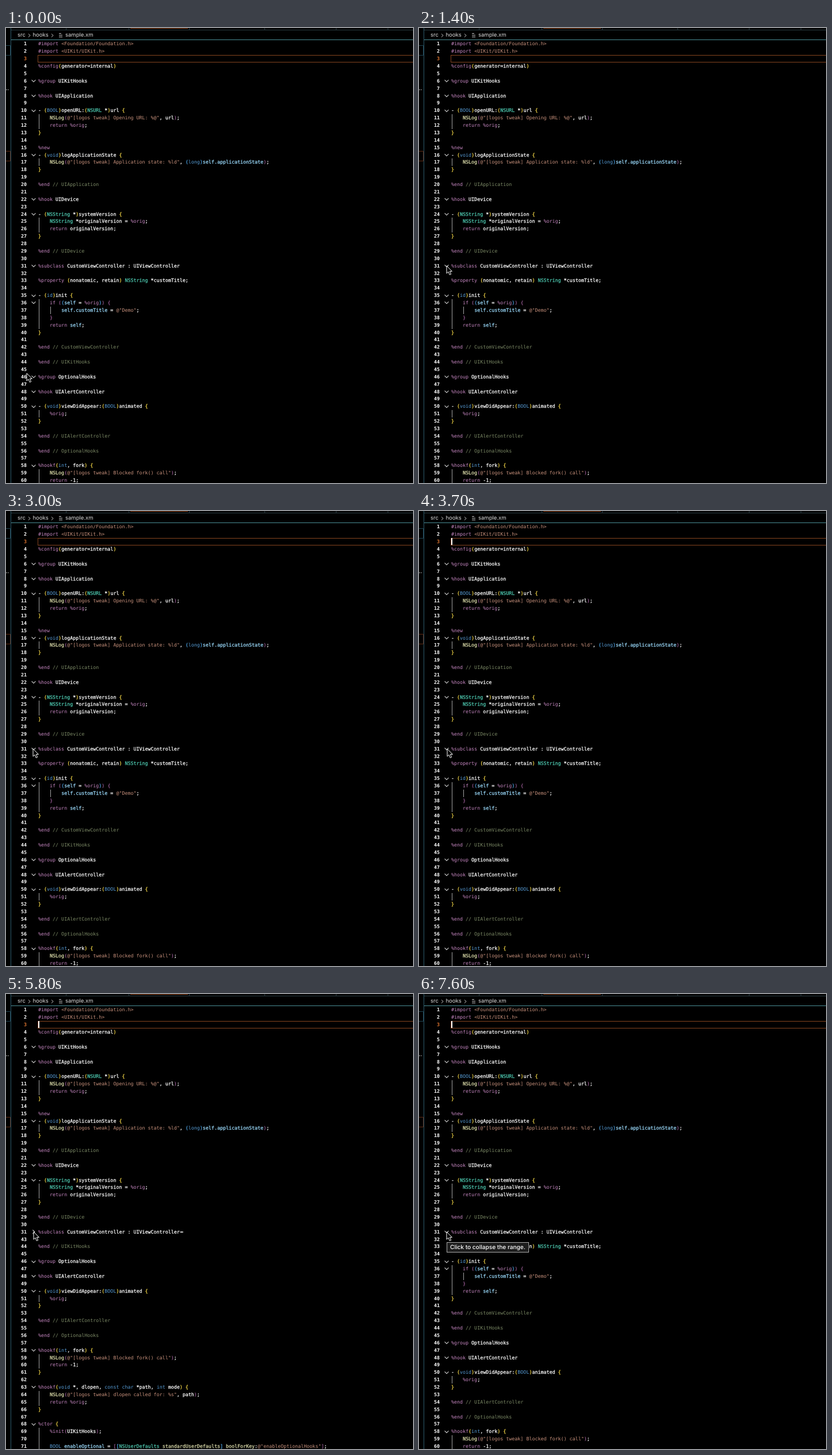
Write an HTML page that moves like this. It is 707x792 px and loops after 7800 ms.

```html
<!DOCTYPE html>
<html lang="en">
<head>
<meta charset="utf-8">
<title>Code folding</title>
<style>
html, body { margin: 0; width: 100%; height: 100%; overflow: hidden; background: #000; }
body { position: relative; color: #fff; text-rendering: geometricPrecision; font: 9.5px Inter, sans-serif; }
svg, .abs { position: absolute; }
svg { left: 0; top: 0; overflow: visible; fill: none; }
#code { top: 21.4px; left: 0; width: 100%; font: 8.33px/12.875px "DejaVu Sans Mono", monospace; }
.row { position: relative; height: 12.875px; white-space: pre; }
.num { position: absolute; left: 0; width: 36px; text-align: right; font-weight: bold; }
.text { position: absolute; left: 56px; -webkit-text-stroke: .25px; }
.keyword, .string, .comment, .prim { -webkit-text-stroke: 0; }
.guide { position: absolute; top: 0; width: 1px; height: 100%; background: #a2a2a2; }
.chevron { left: 43.7px; top: 2.4px; stroke: #ddd; stroke-width: 1.1; transform-origin: 4px 4px; }
.keyword { color: #c586c0; }
.string { color: #c8917c; }
.comment { color: #7c8a66; }
.prim { color: #569cd6; }
.type { color: #4ec9b0; }
.func { color: #dcdcaa; }
.prop { color: #9cdcfe; }
.level0 { color: #ffe04a; }
.level1 { color: #c777c2; -webkit-text-stroke: 0; }
.level2 { color: #4da6e8; }
#active { left: 55px; right: -2px; top: 47px; height: 11px; border: 1px solid #84431f; }
#caret { left: 56px; top: 47px; width: 2px; height: 12px; background: #fff; }
#tip { left: 48px; top: 432px; height: 16px; padding: 0 5px; border: 1px solid #aaa; background: #1d1d1d;
  line-height: 16px; white-space: pre; font-size: 10.1px; font-weight: 500; }
.crumb { top: 5px; line-height: 16px; color: #ddd; }
</style>
</head>
<body>
<svg width="707" height="792">
  <path d="M9 3.5H707M104.5 0V3M213.5 0V3M318.5 0V3M449.5 0V3M573.5 0V3M663.5 0V3" stroke="#2b3c42"/>
  <path d="M216 .5H316" stroke="#8f4218"/>
  <path d="M8.5 0V792" stroke="#2d5a6c"/>
  <path d="M9 20.5H707" stroke="#4a8f96"/>
  <path d="M0 30.5H7.5V47.5H0" stroke="#1f4250"/>
  <path d="M0 214.5H7.5V231.5H0" stroke="#5e2a12"/>
  <path d="M0 107.5h1.5m1.5 0h1.5" stroke="#ccc"/>
  <path d="M39 10l3 3-3 3M79 10l3 3-3 3" stroke="#bbb"/>
  <path d="M92 9.5h4M92 12.5h6M92 15.5h6" stroke="#ccc"/>
</svg>
<div class="abs crumb" style="left:20px">src</div>
<div class="abs crumb" style="left:46.5px">hooks</div>
<div class="abs crumb" style="left:103px">sample.xm</div>
<div id="active" class="abs"></div>
<div id="code" class="abs"></div>
<div id="caret" class="abs"></div>
<div id="tip" class="abs">Click to collapse the range.</div>
<svg id="mouse" width="12" height="18">
  <path d="M0 0V13.2L3 10.4L5.2 15.6L7.6 14.6L5.4 9.6H9.4Z" fill="#000" stroke="#fff" stroke-linejoin="round"/>
</svg>
<script>
const source = `#import <Foundation/Foundation.h>
#import <UIKit/UIKit.h>

%config(generator=internal)

%group UIKitHooks

%hook UIApplication

- (BOOL)openURL:(NSURL *)url {
    NSLog(@"[logos tweak] Opening URL: %@", url);
    return %orig;
}

%new
- (void)logApplicationState {
    NSLog(@"[logos tweak] Application state: %ld", (long)self.applicationState);
}

%end // UIApplication

%hook UIDevice

- (NSString *)systemVersion {
    NSString *originalVersion = %orig;
    return originalVersion;
}

%end // UIDevice

%subclass CustomViewController : UIViewController

%property (nonatomic, retain) NSString *customTitle;

- (id)init {
    if ((self = %orig)) {
        self.customTitle = @"Demo";
    }
    return self;
}

%end // CustomViewController

%end // UIKitHooks

%group OptionalHooks

%hook UIAlertController

- (void)viewDidAppear:(BOOL)animated {
    %orig;
}

%end // UIAlertController

%end // OptionalHooks

%hookf(int, fork) {
    NSLog(@"[logos tweak] Blocked fork() call");
    return -1;
}

%hookf(void *, dlopen, const char *path, int mode) {
    NSLog(@"[logos tweak] dlopen called for: %s", path);
    return %orig;
}

%ctor {
    %init(UIKitHooks);
    
    BOOL enableOptional = [[NSUserDefaults standardUserDefaults] boolForKey:@"enableOptionalHooks"];`;

const tokens = new RegExp([
  /(?<string>@?"[^"]*"|<.+>)/,
  /(?<comment>\/\/.*)/,
  /(?<keyword>[%#][a-z]+|\b(?:return|if)\b)/,
  /(?<prim>\b(?:BOOL|void|id|int|long|const|char)\b)/,
  /(?<type>\bNS(?:String|URL|UserDefaults)\b)/,
  /(?<func>\b(?:NSLog|standardUserDefaults|boolForKey)\b)/,
  /(?<prop>\b(?:self(?:\.\w+)?|enableOptional)\b)/,
  /(?<bracket>[()[\]{}])/
].map(r => r.source).join('|'), 'g');
const foldable = /^%(group|hook|subclass|ctor)|\{$/;
const indentWidth = 4 * 8.33 * 0.602;
const $ = id => document.getElementById(id);

function add(parent, tag, className, text = '') {
  const el = document.createElement(tag);
  el.className = className;
  el.textContent = text;
  parent.append(el);
  return el;
}

let depth = 0;
function bracketClass(char) {
  const level = '([{'.includes(char) ? depth++ : --depth;
  return 'level' + level % 3;
}

function highlight(parent, line) {
  let end = 0;
  for (const match of line.matchAll(tokens)) {
    parent.append(line.slice(end, match.index));
    const kind = Object.keys(match.groups).find(k => match.groups[k]);
    add(parent, 'span', kind === 'bracket' ? bracketClass(match[0]) : kind, match[0]);
    end = match.index + match[0].length;
  }
  parent.append(line.slice(end));
}

const rows = source.split('\n').map((line, i) => {
  const row = add($('code'), 'div', 'row');
  const number = add(row, 'span', 'num', i + 1);
  if (i === 2) number.style.color = '#d9722e';
  if (foldable.test(line)) {
    row.insertAdjacentHTML('beforeend',
      '<svg class="chevron" width="8" height="8"><path d="M.6 2.4L4 5.8L7.4 2.4"/></svg>');
  }
  const indent = line.match(/^ */)[0].length / 4;
  for (let k = 0; k < indent; k++) {
    add(row, 'i', 'guide').style.left = 56.6 + k * indentWidth + 'px';
  }
  highlight(add(row, 'span', 'text'), line);
  return row;
});

const foldRow = rows[30];
const foldChevron = foldRow.querySelector('svg');
const ellipsis = add(foldRow.querySelector('.text'), 'b', '', '⋯');
ellipsis.style.marginLeft = '1px';

// time, x, y of the pointer
const path = [[200, 36, 601], [1200, 48, 414], [1900, 48, 414], [2100, 47, 414],
  [3000, 47, 414], [3300, 49, 414], [4100, 49, 414], [4300, 48, 414]];

function pointerAt(t) {
  const next = path.findIndex(p => p[0] > t);
  if (next < 1) return path.at(next).slice(1);
  const [a, b] = [path[next - 1], path[next]];
  const u = (t - a[0]) / (b[0] - a[0]);
  const eased = u * u * (3 - 2 * u);
  return [1, 2].map(k => a[k] + (b[k] - a[k]) * eased);
}

function draw(now) {
  const t = Math.floor(now % 7800 / 100) * 100;
  const folded = t >= 2100 && t < 3000 || t >= 4600 && t < 6300;
  for (let i = 31; i < 42; i++) rows[i].hidden = folded;
  ellipsis.hidden = !folded;
  foldChevron.style.transform = folded ? 'rotate(-90deg)' : '';
  $('caret').hidden = t % 1000 < 500;
  $('tip').hidden = t < 6900;
  const [x, y] = pointerAt(t);
  $('mouse').style.transform = `translate(${x}px, ${y}px)`;
  requestAnimationFrame(draw);
}
requestAnimationFrame(draw);
</script>
</body>
</html>
```
